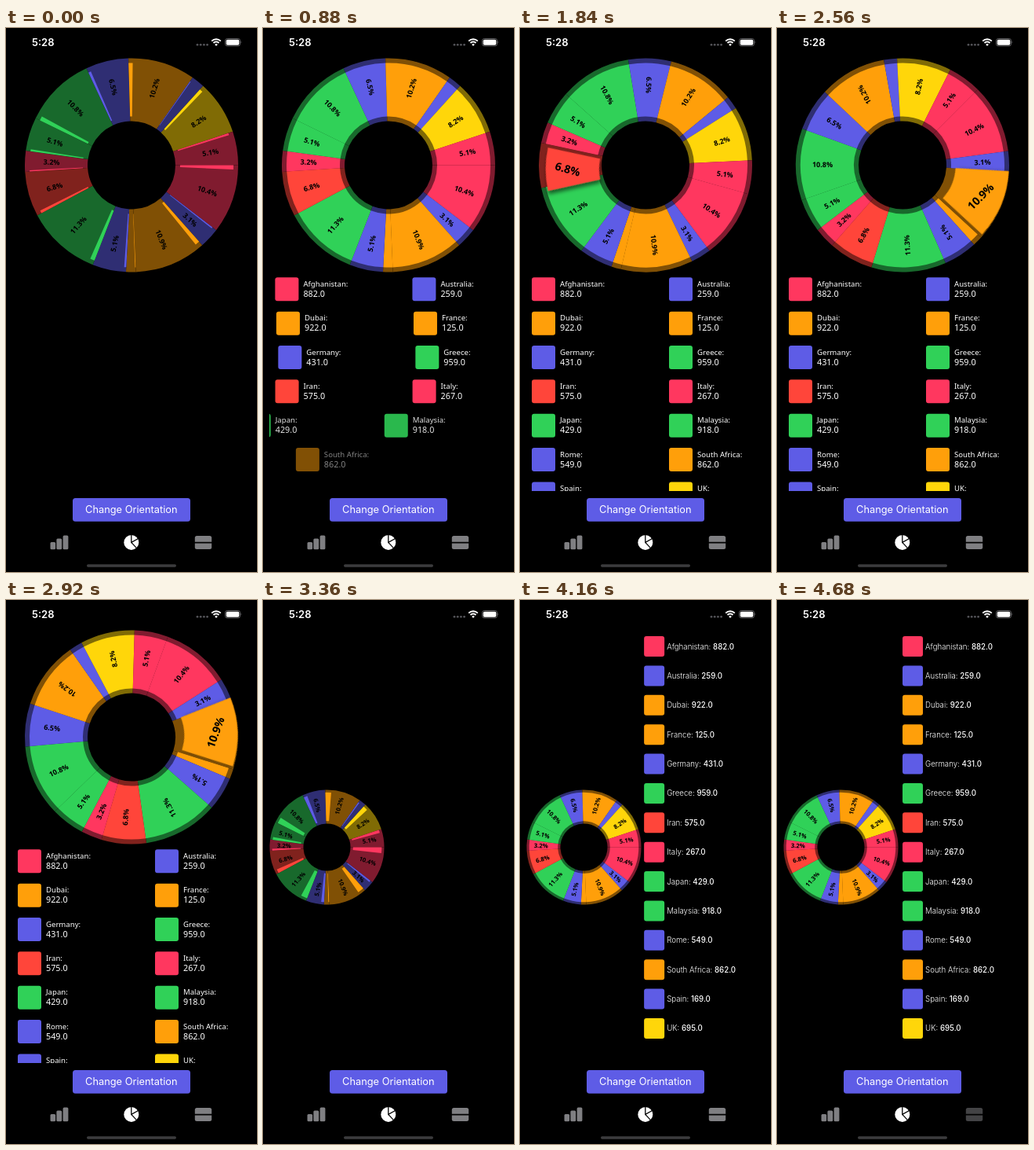
An HTML page for the animation above (4.72 s loop, 320 px wide and 692 px high).

```html
<!DOCTYPE html>
<html lang="en">
<head>
<meta charset="utf-8">
<title>Donut chart</title>
<style>
html, body { margin: 0; width: 100%; height: 100%; overflow: hidden; background: #000; }
svg { display: block; width: 100%; height: 100%; }
text { font-family: Inter, Roboto, sans-serif; fill: #fff; }
.pct text { font-family: "Noto Sans", "Open Sans", sans-serif; font-weight: 600; fill: #000; text-anchor: middle; }
.grid text { font-family: "Noto Sans", "Open Sans", sans-serif; font-weight: 300; font-size: 9.6px; }
.grid .val { font-weight: 500; font-size: 10.8px; }
.list text { font-weight: 300; font-size: 9.7px; }
.list .val { font-weight: 500; }
</style>
</head>
<body>
<svg id="stage" viewBox="0 0 320 692">
  <defs>
    <clipPath id="gridClip"><rect x="8" y="312" width="304" height="277"/></clipPath>
    <clipPath id="listClip"><rect x="150" y="40" width="162" height="549"/></clipPath>
    <filter id="lift" x="-30%" y="-30%" width="160%" height="160%">
      <feDropShadow dx="2" dy="4" stdDeviation="2.5" flood-color="#000" flood-opacity=".55"/>
    </filter>
  </defs>
  <rect width="320" height="692" fill="#000"/>

  <text x="33" y="23" font-size="13" font-weight="600">5:28</text>
  <g fill="#55555a">
    <circle cx="244" cy="21.3" r="1.4"/><circle cx="248.2" cy="21.3" r="1.4"/>
    <circle cx="252.4" cy="21.3" r="1.4"/><circle cx="256.6" cy="21.3" r="1.4"/>
  </g>
  <g fill="none" stroke="#fff" stroke-width="1.9">
    <path d="M262.2 16.6a8.2 8.2 0 0 1 11.6 0"/>
    <path d="M264.5 19a4.9 4.9 0 0 1 7 0"/>
  </g>
  <path d="M268 23l-1.9-2a2.7 2.7 0 0 1 3.8 0z" fill="#fff"/>
  <rect x="279.5" y="13.5" width="19" height="9.4" rx="2.7" fill="none" stroke="#77777a" stroke-width=".8"/>
  <rect x="280.7" y="14.7" width="16.6" height="7" rx="1.7" fill="#fff"/>
  <path d="M299.6 16.6q1.5 1.6 0 3.2z" fill="#77777a"/>

  <g id="chart"><g id="bases" opacity=".5"/><g id="slices"/><g id="labels" class="pct"/></g>
  <g class="grid" clip-path="url(#gridClip)"><g id="grid"/></g>
  <g class="list" clip-path="url(#listClip)"><g id="list"/></g>

  <rect x="85" y="598" width="150" height="29.8" rx="3.5" fill="#5e5ce6"/>
  <text x="159.8" y="617.4" font-size="12.8" text-anchor="middle">Change Orientation</text>

  <g fill="#7f7f82">
    <rect x="56.5" y="654" width="6.6" height="9.2" rx="1.5"/>
    <rect x="64.4" y="649.5" width="6.8" height="13.7" rx="1.5"/>
    <rect x="72.6" y="645.6" width="6.8" height="17.6" rx="1.5"/>
  </g>
  <circle cx="159.8" cy="654.4" r="9.5" fill="#fff"/>
  <path d="M159.8 644V654.4L169 649.2M159.8 654.4L167.2 662.4" fill="none" stroke="#000" stroke-width="1.3"/>
  <g id="cards" fill="#7f7f82">
    <path d="M240.8 653.8V648.6a2.5 2.5 0 0 1 2.5-2.5h16.4a2.5 2.5 0 0 1 2.5 2.5v5.2z"/>
    <path d="M240.8 655.4v5.2a2.5 2.5 0 0 0 2.5 2.5h16.4a2.5 2.5 0 0 0 2.5-2.5v-5.2z"/>
  </g>
  <rect x="103" y="682.3" width="114" height="3.4" rx="1.7" fill="#3c3c3e"/>
</svg>
<script>
const LOOP = 4720, SWAP = 3120, GROW = 900;
const pink = '#ff375f', indigo = '#5e5ce6', orange = '#ff9f0a',
      green = '#30d158', red = '#ff453a', yellow = '#ffd60a';
const data = [
  ['Afghanistan', 882, pink], ['Australia', 259, indigo], ['Dubai', 922, orange],
  ['France', 125, orange], ['Germany', 431, indigo], ['Greece', 959, green],
  ['Iran', 575, red], ['Italy', 267, pink], ['Japan', 429, green],
  ['Malaysia', 918, green], ['Rome', 549, indigo], ['South Africa', 862, orange],
  ['Spain', 169, indigo], ['UK', 695, yellow], ['', 431, pink]
];
const IRAN = 6, DUBAI = 2;
const total = data.reduce((sum, d) => sum + d[1], 0);
const $ = id => document.getElementById(id);
const clamp = x => Math.min(1, Math.max(0, x));
const ease = x => (1 - Math.cos(Math.PI * clamp(x))) / 2;

function add(parent, tag, attrs, text) {
  const el = document.createElementNS('http://www.w3.org/2000/svg', tag);
  for (const k in attrs) el.setAttribute(k, attrs[k]);
  if (text) el.textContent = text;
  return parent.appendChild(el);
}

function point(r, deg) {
  const a = deg * Math.PI / 180;
  return (r * Math.cos(a)).toFixed(2) + ' ' + (r * Math.sin(a)).toFixed(2);
}

function sector(r0, r1, a, b) {
  return `M${point(r1, a)}A${r1} ${r1} 0 0 1 ${point(r1, b)}` +
         `L${point(r0, b)}A${r0} ${r0} 0 0 0 ${point(r0, a)}Z`;
}

// What is left of a damped spring (ratio 0.8) after w*t radians
function spring(x) {
  return x <= 0 ? 1 : Math.exp(-.8 * x) * (Math.cos(.6 * x) + 4 / 3 * Math.sin(.6 * x));
}

// Smooth curve through [time, value] points
function curve(pts, t) {
  const n = pts.length - 1;
  if (t <= pts[0][0]) return pts[0][1];
  if (t >= pts[n][0]) return pts[n][1];
  const i = pts.findIndex(p => p[0] > t) - 1;
  const slope = k => k < 1 || k >= n ? 0 :
    (pts[k + 1][1] - pts[k - 1][1]) / (pts[k + 1][0] - pts[k - 1][0]);
  const [t0, v0] = pts[i], [t1, v1] = pts[i + 1];
  const h = t1 - t0, u = (t - t0) / h, s = u * u * (3 - 2 * u);
  return v0 + (v1 - v0) * s + h * u * (1 - u) * ((1 - u) * slope(i) - u * slope(i + 1));
}
const spin = [[1200, 0], [1600, 13], [1840, 15.7], [2200, -13], [2560, -45], [2920, -70], [3120, -78]];

let angle = 0;
const slices = data.map(([name, value, color]) => {
  const start = angle, sweep = value / total * 360, mid = start + sweep / 2;
  angle += sweep;
  add($('bases'), 'path', { d: sector(56, 136, start, angle), fill: color });
  const share = value / total * 100;
  return {
    start, sweep, mid,
    turn: mid > 90 && mid < 270 ? mid - 180 : mid,
    path: add($('slices'), 'path', { fill: color }),
    label: share > 3 ? add($('labels'), 'text', {}, share.toFixed(1) + '%') : null
  };
});

const rows = [];
data.slice(0, 14).forEach(([name, value, color], i) => {
  const row = i >> 1, x = i % 2 ? 190 : 15, y = 317.3 + row * 43.35;
  rows[row] = rows[row] || add($('grid'), 'g', {});
  add(rows[row], 'rect', { x, y, width: 30, height: 30, rx: 3, fill: color });
  add(rows[row], 'text', { x: x + 36, y: y + 11.7 }, name + ':');
  add(rows[row], 'text', { x: x + 36, y: y + 24.5, class: 'val' }, value.toFixed(1));

  const ly = 46 + i * 37.38;
  add($('list'), 'rect', { x: 160, y: ly, width: 26, height: 26, rx: 3, fill: color });
  const line = add($('list'), 'text', { x: 189, y: ly + 16.5 }, name + ': ');
  add(line, 'tspan', { class: 'val' }, value.toFixed(1));
});

function picked(i, t) {
  if (t >= SWAP) return 0;
  if (i === IRAN) return ease((t - 1300) / 250) - ease((t - 2120) / 250);
  if (i === DUBAI) return ease((t - 2150) / 250);
  return 0;
}

function drawChart(t, wide) {
  const grown = ease((t - (wide ? SWAP : -145)) / GROW);
  const base = wide ? 14.3 : 9;
  $('chart').setAttribute('transform', wide
    ? 'translate(81.5 314.5) scale(.537)'
    : `translate(160 174.5) rotate(${curve(spin, t).toFixed(2)})`);
  slices.forEach((s, i) => {
    const p = picked(i, t), shift = `translate(${4 * p} ${4 * p})`;
    s.path.setAttribute('d', sector(62, 130, s.start, s.start + s.sweep * grown));
    s.path.setAttribute('transform', shift);
    if (p > .02) s.path.setAttribute('filter', 'url(#lift)');
    else s.path.removeAttribute('filter');
    if (!s.label) return;
    const size = base + 5 * p;
    s.label.setAttribute('font-size', size);
    s.label.setAttribute('y', size * .36);
    s.label.setAttribute('transform',
      `${shift} translate(${point(102, s.mid)}) rotate(${s.turn * (1 - p)})`);
  });
}

function place(el, dx, alpha) {
  el.setAttribute('transform', `translate(${dx.toFixed(2)} 0)`);
  el.setAttribute('opacity', clamp(alpha).toFixed(3));
}

function draw(t) {
  const wide = t >= SWAP;
  drawChart(t, wide);
  rows.forEach((row, i) => {
    const left = spring((t - 223 - i * 107.4) * .012566);
    place(row, -300 * left, wide ? 0 : 1 - left);
  });
  const left = spring((t - 3360) * .00745);
  place($('list'), 150 * left, wide ? 1 - left : 0);
  $('cards').setAttribute('opacity', 1 - .47 * clamp((t - 4540) / 100));
}

const begin = performance.now();
function tick() {
  draw((performance.now() - begin) % LOOP);
  requestAnimationFrame(tick);
}
tick();
</script>
</body>
</html>
```
